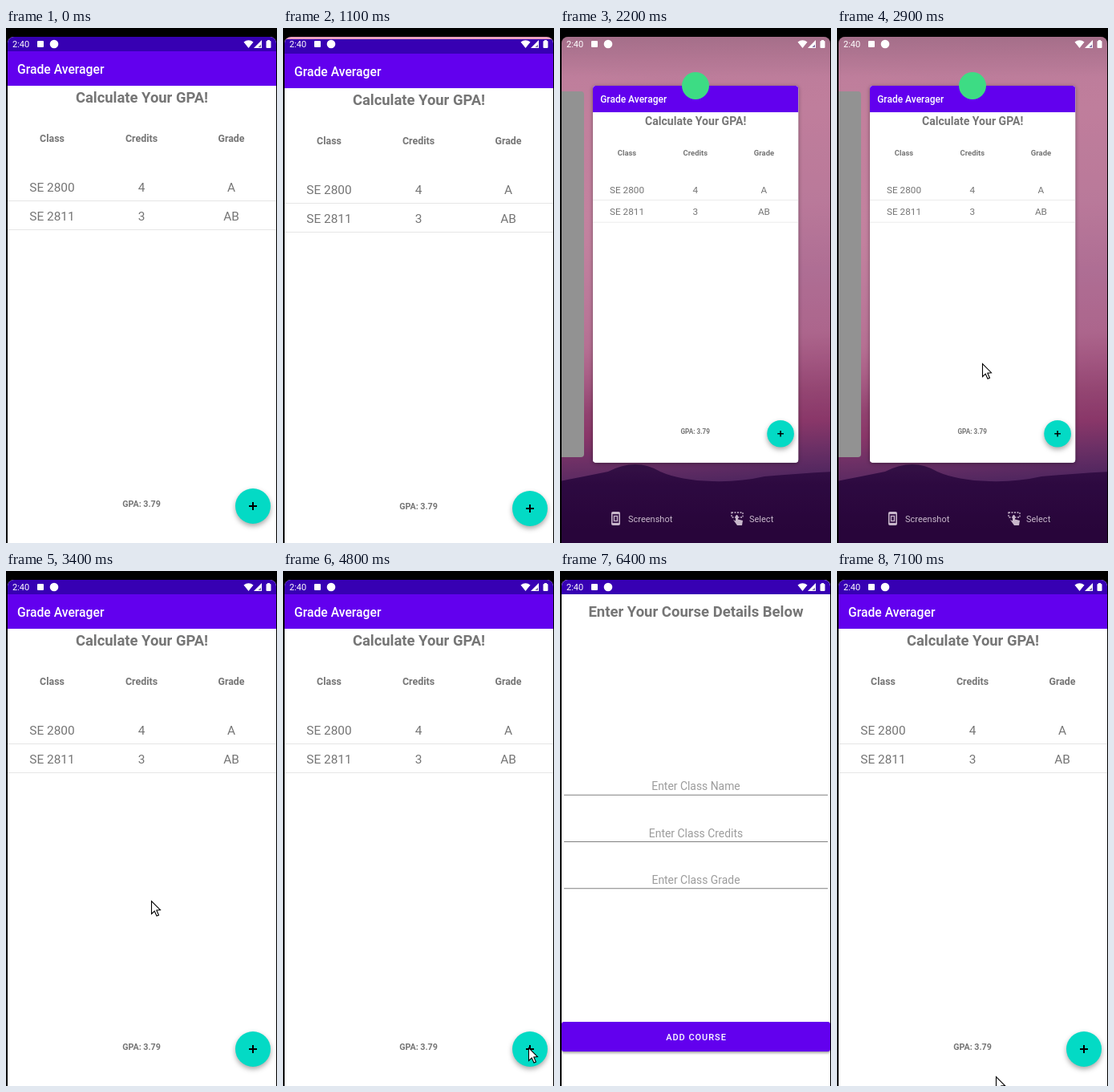
Write an HTML page with a canvas that moves like this. It is 338 px wide and 642 px high and loops after 7.2 s.

```html
<!DOCTYPE html>
<html lang="en">
<head>
<meta charset="utf-8">
<title>Grade app demo</title>
<style>
html, body { margin: 0; width: 338px; height: 642px; overflow: hidden; background: #000; }
canvas { display: block; }
</style>
</head>
<body>
<canvas id="stage" width="338" height="642"></canvas>
<script>
const c = document.getElementById('stage').getContext('2d');
const LOOP = 7200, STEP = 100;
const GREY = '#757575', PURPLE = '#6200ee', DARK_PURPLE = '#3700b3';

const clamp = v => Math.max(0, Math.min(1, v));
const span = (t, from, to) => clamp((t - from) / (to - from));
const mix = (a, b, k) => a + (b - a) * k;
const easeOut = (k, power) => 1 - (1 - k) ** power;

function rect(x, y, w, h, color, r = 0) {
  c.fillStyle = color;
  c.beginPath();
  c.roundRect(x, y, w, h, r);
  c.fill();
}

function disc(x, y, r, color) {
  c.fillStyle = color;
  c.beginPath();
  c.arc(x, y, r, 0, 7);
  c.fill();
}

function shape(points, color) {
  c.fillStyle = color;
  c.beginPath();
  points.forEach(p => c.lineTo(...p));
  c.closePath();
  c.fill();
}

// y is the middle of the capital letters
function text(s, x, y, size, color, weight = 400, align = 'center', spacing = 0) {
  c.font = `${weight} ${size}px Roboto, sans-serif`;
  c.letterSpacing = spacing + 'px';
  c.textAlign = align;
  c.fillStyle = color;
  c.fillText(s, x, y + size * 0.355);
}

function layer(alpha, paint) {
  if (alpha <= 0) return;
  c.save();
  c.globalAlpha *= alpha;
  paint();
  c.restore();
}

function shadow(blur, y, color) {
  c.shadowBlur = blur;
  c.shadowOffsetY = y;
  c.shadowColor = color;
}

function zoom(s) {
  c.translate(169.5, 326);
  c.scale(s, s);
  c.translate(-169.5, -326);
}

function statusIcons() {
  text('2:40', 8, 20, 11, '#fff', 400, 'left');
  rect(39, 16, 8, 8, '#fff', 1);
  disc(60, 20, 5.3, '#fff');
  c.fillStyle = '#fff';
  c.beginPath();
  c.moveTo(302.5, 25);
  c.lineTo(296.5, 17.5);
  c.quadraticCurveTo(302.5, 13, 308.5, 17.5);
  c.fill();
  shape([[309, 25], [319, 25], [319, 15]], '#fff');
  shape([[314.5, 24], [318, 24], [318, 20.5]], '#8070a8');
  rect(324.5, 16, 6, 9, '#fff', 1);
  rect(326, 15, 3, 2, '#fff');
}

function app() {
  rect(2, 11, 335, 640, '#fff');
  rect(2, 11, 335, 18, DARK_PURPLE);
  rect(2, 29, 335, 43, PURPLE);
  text('Grade Averager', 14, 51.5, 15.7, '#fff', 500, 'left');
  text('Calculate Your GPA!', 169.5, 86.5, 18.4, GREY, 700);
  const columns = [57.5, 169, 281];
  ['Class', 'Credits', 'Grade'].forEach((s, i) => text(s, columns[i], 138, 12.4, GREY, 700));
  [['SE 2800', '4', 'A'], ['SE 2811', '3', 'AB']].forEach((row, j) => {
    row.forEach((s, i) => text(s, columns[i], 198.5 + 36 * j, 15.4, GREY));
    rect(2, 215 + 36 * j, 335, 1, '#e6e6e6');
  });
  text('GPA: 3.79', 169, 593, 10.7, GREY, 700);
  c.save();
  shadow(6, 3, 'rgba(0,0,0,.35)');
  disc(308, 596, 22, '#03dac5');
  c.restore();
  rect(303, 595, 10, 2, '#000');
  rect(307, 591, 2, 10, '#000');
}

function form() {
  rect(2, 11, 335, 640, '#fff');
  rect(2, 11, 335, 18, DARK_PURPLE);
  text('Enter Your Course Details Below', 169.5, 50.3, 18.5, GREY, 700);
  ['Name', 'Credits', 'Grade'].forEach((s, i) => {
    const y = 268.5 + 58.2 * i;
    text('Enter Class ' + s, 169.5, y, 13.9, '#9c9c9c');
    rect(5, y + 10.3, 329, 1, '#808080');
  });
  c.save();
  shadow(3, 2, 'rgba(0,0,0,.35)');
  rect(2, 562, 335, 37, PURPLE, 3);
  c.restore();
  text('ADD COURSE', 170, 581, 11, '#fff', 500, 'center', 0.95);
}

function stops(gradient, list) {
  list.forEach(stop => gradient.addColorStop(...stop));
  return gradient;
}

const vertical = (y0, y1, list) => stops(c.createLinearGradient(0, y0, 0, y1), list);

function wallpaper(dim) {
  c.save();
  c.translate(0, -16 * dim);
  rect(0, 11, 338, 660, stops(c.createLinearGradient(150, 11, 190, 590), [
    [0, '#eba0c0'], [.2, '#f3a3c3'], [.4, '#eb9cc0'], [.55, '#dc8db8'], [.68, '#d982ae'],
    [.74, '#cb6d9e'], [.8, '#b9588c'], [.87, '#aa437e'], [.93, '#813979'], [1, '#552a70']]));
  rect(0, 11, 338, 500, stops(c.createRadialGradient(0, 270, 0, 0, 270, 230), [
    [0, 'rgba(255,176,204,.75)'], [.5, 'rgba(255,172,200,.45)'], [1, 'rgba(255,170,198,0)']]));
  c.fillStyle = vertical(560, 642, [[0, '#38104f'], [.3, '#2e0648'], [1, '#27003f']]);
  c.beginPath();
  c.moveTo(0, 581);
  [[30, 575, 60, 569], [95, 551, 125, 569], [150, 580, 190, 581], [225, 582, 255, 575],
   [300, 571, 340, 569]].forEach(p => c.quadraticCurveTo(...p));
  c.lineTo(340, 680);
  c.lineTo(0, 680);
  c.fill();
  c.restore();
  rect(0, 11, 338, 640, `rgba(45,20,45,${0.26 * dim})`);
}

const topScrim = () =>
  rect(0, 11, 338, 50, vertical(11, 61, [[0, 'rgba(50,40,50,.45)'], [1, 'rgba(50,40,50,0)']]));

function home() {
  c.save();
  shadow(3, 1, 'rgba(60,20,50,.6)');
  text('Tuesday, Mar 30', 65, 83.5, 18, '#fff', 400, 'left', 0.6);
  text('64°F', 236, 83.5, 18, '#fff', 400, 'left', 0.6);
  c.restore();
  disc(221.5, 82, 8.7, '#fcc934');
  disc(214.5, 86, 3, '#f4eef2');
  disc(217, 87, 2.5, '#f4eef2');
  disc(106, 540, 19.5, '#1a6fe3');
  disc(231.5, 540, 19.5, '#dc4a3e');
  rect(24, 589, 290, 34, '#d6cedd', 17);
  disc(43, 606, 9.5, '#4285f4');
  disc(295, 606, 8, '#4285f4');
}

// open: 0 is the small card, 1 fills the screen
function card(open) {
  const s = mix(0.765, 1, open), x = mix(41, 2, open), y = mix(72, 29, open);
  const top = mix(29, 11, open);
  c.save();
  c.translate(x, y);
  c.scale(s, s);
  c.translate(-2, -29);
  c.save();
  shadow(5, 1, 'rgba(0,0,0,.4)');
  rect(2, top, 335, 643 - top, '#fff', 5);
  c.restore();
  c.beginPath();
  c.roundRect(2, top, 335, 643 - top, 5 * (1 - open));
  c.clip();
  app();
  c.restore();
}

function recentsExtras() {
  const ink = '#c8b7cb';
  rect(-20, 79, 50, 456, '#929292', 4);
  text('Screenshot', 85, 612, 11, ink, 400, 'left');
  text('Select', 236, 612, 11, ink, 400, 'left');
  rect(64, 603, 11, 17, ink, 2);
  rect(65.5, 606, 8, 11, '#38164a');
  c.strokeStyle = ink;
  c.lineWidth = 1.3;
  c.strokeRect(67.5, 608.5, 4, 6);
  c.setLineDash([2, 1.5]);
  c.strokeRect(214, 604, 14, 6);
  c.setLineDash([]);
  rect(219, 607, 3, 9, ink, 1.5);
  shape([[216, 613], [220, 615], [220, 612], [228, 614], [227, 620], [221, 620]], ink);
}

function recents(open) {
  layer(1 - open * 2, recentsExtras);
  card(open);
  layer(1 - open * 3, () => disc(169, 72, 17, '#3ddc84'));
}

const paths = [
  [[2500, 345, 450], [2800, 181, 420], [3300, 181, 411], [3400, 181, 411],
   [4200, 306, 594], [5400, 306, 594], [5700, 350, 520]],
  [[6700, 345, 470], [7000, 188, 600], [7100, 198, 630], [7200, 204, 650]]
];

function cursor(t) {
  for (const path of paths) {
    const i = path.findIndex(p => p[0] > t);
    if (i < 1) continue;
    const [a, b] = [path[i - 1], path[i]];
    const k = span(t, a[0], b[0]);
    c.save();
    c.translate(mix(a[1], b[1], k) + 0.5, mix(a[2], b[2], k) + 0.5);
    const arrow = [[0, 0], [0, 16], [3.7, 12.5], [6.5, 18.5], [9, 17.5], [6.3, 11.5], [11, 11]];
    shape(arrow, '#fff');
    c.strokeStyle = '#000';
    c.lineWidth = 1.1;
    c.stroke();
    c.restore();
  }
}

function screen(t) {
  if (t >= 1096 && t < 3400) {
    const toHome = span(t, 1120, 1350);
    const toRecents = easeOut(span(t, 2020, 2200), 2);
    const open = easeOut(span(t, 2980, 3340), 3);
    wallpaper(toRecents);
    layer(toHome * mix(1, 0.35, toRecents), topScrim);
    layer(toHome * (1 - toRecents), home);
    layer(toRecents, () => {
      zoom(mix(1.15, 1, toRecents));
      recents(open);
    });
    layer(1 - span(t, 1121, 1246), () => {
      c.translate(0, Math.round(94 * easeOut(span(t, 1095.3, 1346), 1.7)));
      app();
    });
    return;
  }
  const closing = easeOut(span(t, 6400, 6750), 3);
  c.save();
  if (t >= 6400) zoom(mix(1.1, 1, closing));
  app();
  c.restore();
  const opening = easeOut(span(t, 5500, 6100), 5);
  layer(span(t, 5490, 5590) * (1 - span(t, 6420, 6540)), () => {
    zoom(mix(0.85, 1, opening) - 0.1 * closing);
    form();
  });
}

function draw(now) {
  const t = Math.floor(now % LOOP / STEP) * STEP;
  rect(0, 0, 338, 642, '#000');
  c.save();
  c.beginPath();
  c.roundRect(2, 11, 335, 640, [8, 8, 0, 0]);
  c.clip();
  screen(t);
  statusIcons();
  c.restore();
  cursor(t);
}

let start;
function tick(now) {
  start ??= now;
  draw(now - start);
  requestAnimationFrame(tick);
}
draw(0);
requestAnimationFrame(tick);
</script>
</body>
</html>
```
